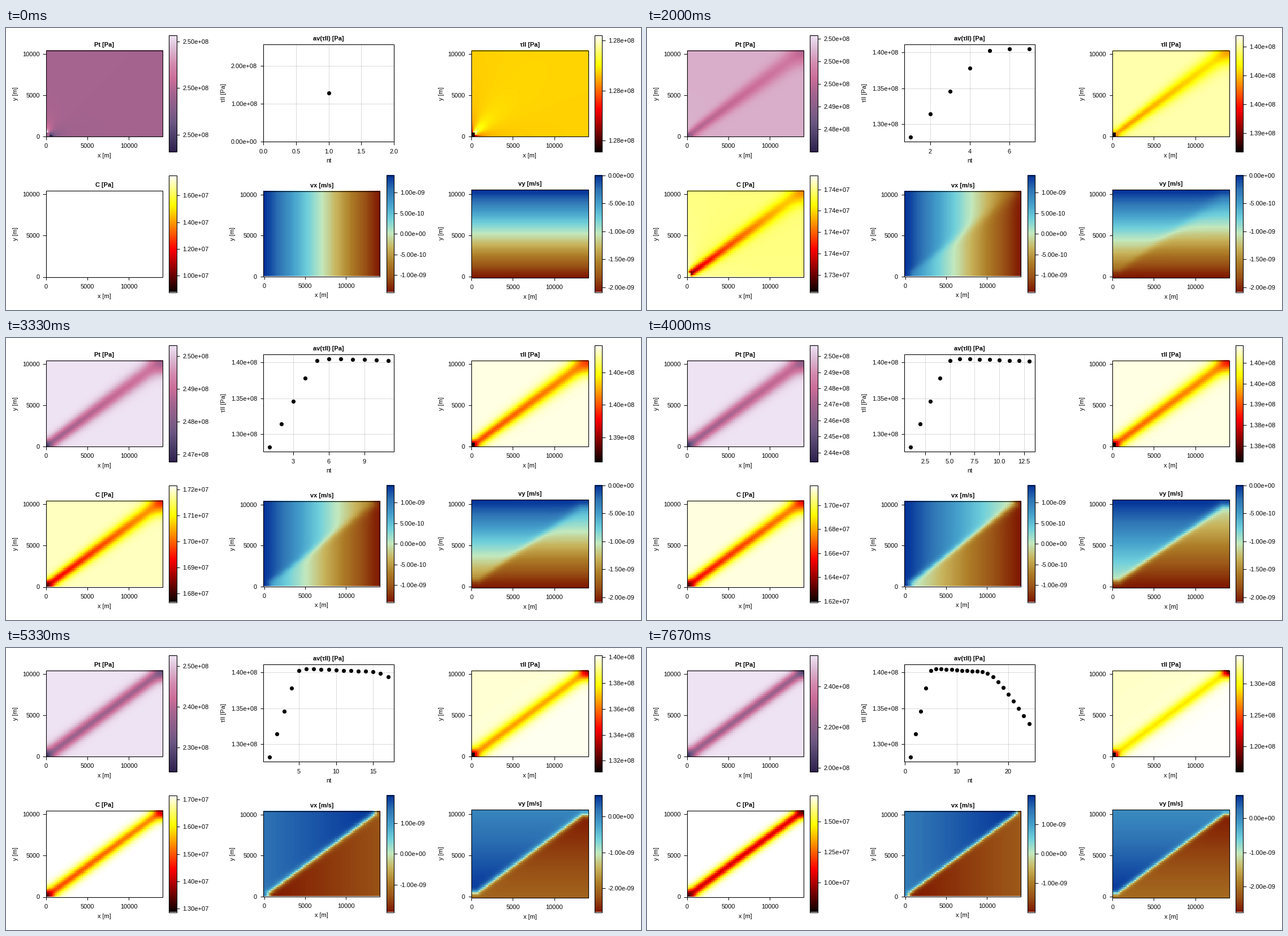
A matplotlib script for the animation above (8 s loop, 1123x499 px).

```python
import math
import numpy as np
import matplotlib.pyplot as plt
from matplotlib.animation import FuncAnimation
from matplotlib.colors import LinearSegmentedColormap
from matplotlib.patches import Rectangle

W, H, DPI = 1123, 499, 100
FRAMES, INTERVAL = 80, 100
PX = 72 / DPI
plt.rcParams.update({"font.family": "Liberation Sans", "font.size": 11 * PX})

PLUM = LinearSegmentedColormap.from_list("plum", [
    "#2e214d", "#4a3d68", "#6b5782", "#885f89", "#a4648f",
    "#cb6d98", "#d489ae", "#dbb8d2", "#f0e6f6"])
EARTH_SKY = LinearSegmentedColormap.from_list("earth_sky", [
    "#7e1700", "#995216", "#ae7e28", "#c8b45c", "#c3e9be",
    "#70d0db", "#45a0cb", "#2e73b4", "#023198"])

LX, LY = 206.3, 152.5   # model size in pixels
CELL = 6.4              # size of the weak inclusion
VX, VY = 1.41e-9, 2.086e-9


def ramp(n, start, end):
    return min(max((n - start) / (end - start), 0), 1)


def sigmoid(n, middle, width):
    return 1 / (1 + math.exp((middle - n) / width))


def fade(n):
    """Influence of the inclusion: full until yield at step 4, then lost."""
    return math.exp(-(max(n - 4, 0) / 2) ** 2)


def softening(n, middle):
    return sigmoid(n, middle, 1.95) - sigmoid(0, middle, 1.95)


def mean_stress(n):
    """Elastic rise, smooth yield, slow plateau, then accelerating decline."""
    n = np.asarray(n, float)
    elastic, plateau, blend = 1.282 + .032 * n, 1.4047 - .00043 * (n - 5), .007
    late = np.maximum(n - 14, 0)
    drop = .0104 * (late - 2.5 * (1 - np.exp(-late / 2.5)))
    return -blend * np.logaddexp(-elastic / blend, -plateau / blend) - drop


def color_range(name, n):
    if name == "Pt":
        span = .0125 + .0047 * n * fade(n) + .58 * softening(n, 16.2)
        high, unit = 2.5 + span * (.095 + .36 * fade(n)), 1e8
    elif name == "τII":
        span = .0117 + .0035 * n * fade(n) + .18 * softening(n, 16.5)
        high, unit = float(mean_stress(n)) + .09 * span + .0025 * fade(n), 1e8
    else:
        span = .0016 * min(n, 8) + .98 * softening(n, 16.6)
        high, unit = 1.7145 + .0355 * math.exp(-(max(n - 4, 0) / 4.7) ** 2), 1e7
        span = span or high / 2
    return (high - span) * unit, high * unit


def levels(name, n):
    """Background level, and band depth at the lower and upper end."""
    onset, weak = ramp(n, 0, 4), fade(n)
    if name == "Pt":
        return (.99 - weak * (.49 - .11 * onset),
                .55 * ramp(n, 0, 10), .55 * ramp(n, 2, 17))
    if name == "τII":
        return (.97 - weak * (.29 - .145 * onset),
                .57 * ramp(n, 4, 7) - .3 * ramp(n, 7, 22) - .09 * onset * weak,
                .38 * ramp(n, 4, 8) - .12 * ramp(n, 13, 22))
    return (1 - .16 * onset * (1 - ramp(n, 4, 14)),
            .62 * onset - .13 * ramp(n, 12, 19) + .23 * ramp(n, 19, 23),
            .42 * ramp(n, 2, 13) + .26 * ramp(n, 19, 23))


def grid(nx, ny, edge_x=False, edge_y=False):
    def axis(count, length, edge):
        if edge:
            return np.linspace(0, length, count)
        return (np.arange(count) + .5) * length / count
    return np.meshgrid(axis(nx, LX, edge_x), axis(ny, LY, edge_y))


def diagonal(x, y):
    return (y * LX - x * LY) / math.hypot(LX, LY)


def band_field(name, n):
    """Shear band along the diagonal plus the halo of the inclusion."""
    x, y = grid(64, 47)
    xi, d = x / LX, diagonal(x, y)
    r, phi = np.hypot(x, y), np.arctan2(y, x)
    inside = (x < CELL) & (y < CELL)
    near = np.where(inside, 0, CELL / r)
    onset, weak = ramp(n, 0, 4), fade(n)

    back, lower, upper = levels(name, n)
    along = xi ** (.45 + .55 * ramp(n, 4, 8)) if name == "C" else xi
    width = {"Pt": 11, "τII": 12, "C": 11}[name] - 2 * ramp(n, 14, 20)
    width = width * (1 + (1 - ramp(n, 4, 16)) * (xi - .5))
    u = back - (lower + (upper - lower) * along) * np.exp(-np.abs(d / width) ** 1.7)

    halo = weak * (1 - .45 * onset)
    if name == "Pt":
        u -= 1.1 * halo * np.cos(2 * phi) * near ** 2
    elif name == "τII":
        u -= .55 * halo * np.cos(4 * phi) * near ** 1.5
        u -= .025 * ramp(n, 12, 19) * np.tanh(d / 30)
    else:
        u += .9 * onset * weak * np.cos(4 * phi) * near ** 1.3

    far = np.hypot(LX - x, LY - y) / (22 - 10 * ramp(n, 8, 19))
    top = back - (.45 + .45 * ramp(n, 8, 20))
    u += ramp(n, 4, 8) * (top - u) * np.exp(-far ** 2)
    radius = 4 + 6.5 * ramp(n, 4, 12)
    u += ramp(n, 2, 8) * (.06 - u) * np.exp(-(r / radius) ** 2)
    if name == "τII":
        u[inside] = .02
    elif name == "C" and n < 10:
        u[inside] = 1 - .25 * ramp(n, 4, 8)
    return np.clip(u, 0, 1)


def velocity_field(name, n):
    """Two blocks sliding along the diagonal; returns field and its range."""
    width = 3.5 + 10.5 * math.exp(-n / 8)
    reach = min(1.6 * width, 10)
    creep, slip = .022 * min(n, 8), sigmoid(n, 12.95, .92) * ramp(n, 4, 8)
    if name == "vx":
        x, y = grid(65, 47, edge_x=True)
        stretch = 1 - creep - 1.03 * slip
        d = np.minimum(np.maximum(diagonal(x, y), reach - x), LX - x - reach)
        upper = VX * (1 - 2 * stretch * x / LX)
        lower = VX * (-1 + 2 * stretch * (1 - x / LX))
        high = VX * max(1, 1 - 2 * stretch)
        low = -high
    else:
        x, y = grid(64, 48, edge_y=True)
        stretch = 1 - creep - 1.14 * slip
        d = np.minimum(np.maximum(diagonal(x, y), reach - (LY - y)), y - reach)
        upper = -VY * stretch * (1 - y / LY)
        lower = VY * (-1 + stretch * y / LY)
        high = VY * max(0, -stretch)
        low = -VY - high
    spread = 1.4 * (1 - ramp(n, 2, 14))
    side = .5 + .5 * np.tanh(d / (width * (1 + spread * (x / LX - .5))))
    return (lower + side * (upper - lower) - low) / (high - low), low, high


def nice_ticks(low, high):
    """Pick the tick step with the best mix of count, coverage and roundness."""
    span = high - low
    slack = 1e-9 * span
    top = math.floor(math.log10(span))
    best, chosen = -math.inf, []
    for z in (top, top - 1):
        for q, nice in ((1, 1), (5, .9), (2, .7), (2.5, .5), (3, .2)):
            step = q * 10.0 ** z
            first, last = math.floor(low / step), math.ceil(high / step)
            values = [i * step for i in range(first, last + 1)
                      if low - slack <= i * step <= high + slack]
            if last - first > 9 or len(values) < 3:
                continue
            zero = max(last, 0) - min(first, 0) <= 9
            score = (.25 * (1 - abs(len(values) - 5) / 5) + zero / 6
                     + .5 * span / (values[-1] - values[0]) + .25 * nice)
            # on equal scores the wider step wins
            if score > best + 1e-6 or (abs(score - best) <= 1e-6
                                       and len(values) < len(chosen)):
                best, chosen = score, values
    return chosen


def sci(value):
    return f"{value:.2e}"


def plain(values):
    digits = next(k for k in range(4)
                  if all(abs(v - round(v, k)) < 1e-6 for v in values))
    return [f"{v:.{digits}f}" for v in values]


fig = plt.figure(figsize=(W / DPI, H / DPI), dpi=DPI, facecolor="white")
ax = fig.add_axes([0, 0, 1, 1])


def text(x, y, label, ha="center", **kw):
    ax.text(x, y + 4, label, ha=ha, va="baseline", **kw)


def line(xs, ys, alpha=1, z=4):
    ax.plot(xs, ys, color="black", alpha=alpha, lw=PX, zorder=z,
            solid_capstyle="butt")


def frame(l, t, r, b):
    ax.add_patch(Rectangle((l, t), r - l, b - t, fill=False, ec="black",
                           lw=1.1 * PX, zorder=5))


def image(field, cmap, box):
    l, t, r, b = box
    ax.imshow(field, cmap=cmap, vmin=0, vmax=1, extent=(l, r, b, t),
              origin="lower", aspect="auto", interpolation="nearest", zorder=2)


def axes_box(box, title, xlabel, ylabel, label_x, xticks, yticks):
    l, t, r, b = box
    frame(*box)
    text((l + r) / 2, t - 11, title, weight="bold")
    text((l + r) / 2, b + 33, xlabel)
    ax.text(label_x, (t + b) / 2, ylabel, rotation=90, ha="center", va="center")
    for x, label in xticks:
        line([x, x], [b, b + 5.5])
        text(x, b + 16.5, label)
    for y, label in yticks:
        line([l - 5.5, l], [y, y])
        text(l - 11, y, label, "right")


def color_bar(l, t, cmap, low, high):
    r, b = l + 13.5, t + 206.5
    image(np.linspace(0, 1, 256)[:, None], cmap, (l, t, r, b))
    frame(l, t, r, b)
    for value in nice_ticks(low, high):
        y = b - (value - low) / (high - low) * (b - t)
        line([r, r + 5.5], [y, y])
        text(r + 10.5, y, sci(value), "left")


def heat_panel(title, box, origin, per_km, bar_top, cmap, field, low, high):
    l, t, r, b = box
    image(field, cmap, box)
    marks = (0, 5000, 10000)
    axes_box(box, title, "x [m]", "y [m]", l - 53.5,
             [(origin[0] + m / 1000 * per_km, str(m)) for m in marks],
             [(origin[1] - m / 1000 * per_km, str(m)) for m in marks])
    color_bar(r + 11.3, bar_top, cmap, low, high)


def history_panel(n):
    box = l, t, r, b = 455, 29, 686, 201
    steps = np.arange(n + 1)
    count, mean = steps + 1, mean_stress(steps) * 1e8

    def limits(values):
        if len(values) == 1:
            return 0, 2 * values[0]
        pad = .05 * np.ptp(values)
        return values.min() - pad, values.max() + pad

    (x0, x1), (y0, y1) = limits(count), limits(mean)

    def to_x(v):
        return l + (v - x0) / (x1 - x0) * (r - l)

    def to_y(v):
        return b - (v - y0) / (y1 - y0) * (b - t)

    xs, ys = nice_ticks(x0, x1), nice_ticks(y0, y1)
    for v in xs:
        line([to_x(v)] * 2, [t, b], alpha=.14, z=1)
    for v in ys:
        line([l, r], [to_y(v)] * 2, alpha=.14, z=1)
    axes_box(box, "av(τII) [Pa]", "nt", "τII [Pa]", 385.5,
             [(to_x(v), s) for v, s in zip(xs, plain(xs))],
             [(to_y(v), sci(v)) for v in ys])
    ax.plot(to_x(count), to_y(mean), "o", color="black", ms=7.2 * PX, mew=0, zorder=6)


def draw(i):
    n = (3 * i + 2) // 10   # three model steps per second
    ax.clear()
    ax.axis("off")
    ax.set(xlim=(0, W), ylim=(H, 0), autoscale_on=False)
    for name, l, t, bar_top, cmap in (("Pt", 70.8, 39.5, 12.5, PLUM),
                                      ("τII", 823.2, 39.5, 12.5, "hot"),
                                      ("C", 70.8, 288, 261, "hot")):
        box = (l, t, l + LX, t + LY)
        heat_panel(f"{name} [Pa]", box, (l, t + LY), 14.65, bar_top, cmap,
                   band_field(name, n), *color_range(name, n))
    heat_panel("vx [m/s]", (455, 289.3, 661.4, 439.5), (456.6, 439.5), 14.44,
               261, EARTH_SKY, *velocity_field("vx", n))
    heat_panel("vy [m/s]", (823.2, 285.6, 1029.6, 441.6), (823.2, 440), 14.65,
               261, EARTH_SKY, *velocity_field("vy", n))
    history_panel(n)
    return []


anim = FuncAnimation(fig, draw, frames=FRAMES, interval=INTERVAL, repeat=True)
plt.show()
```
